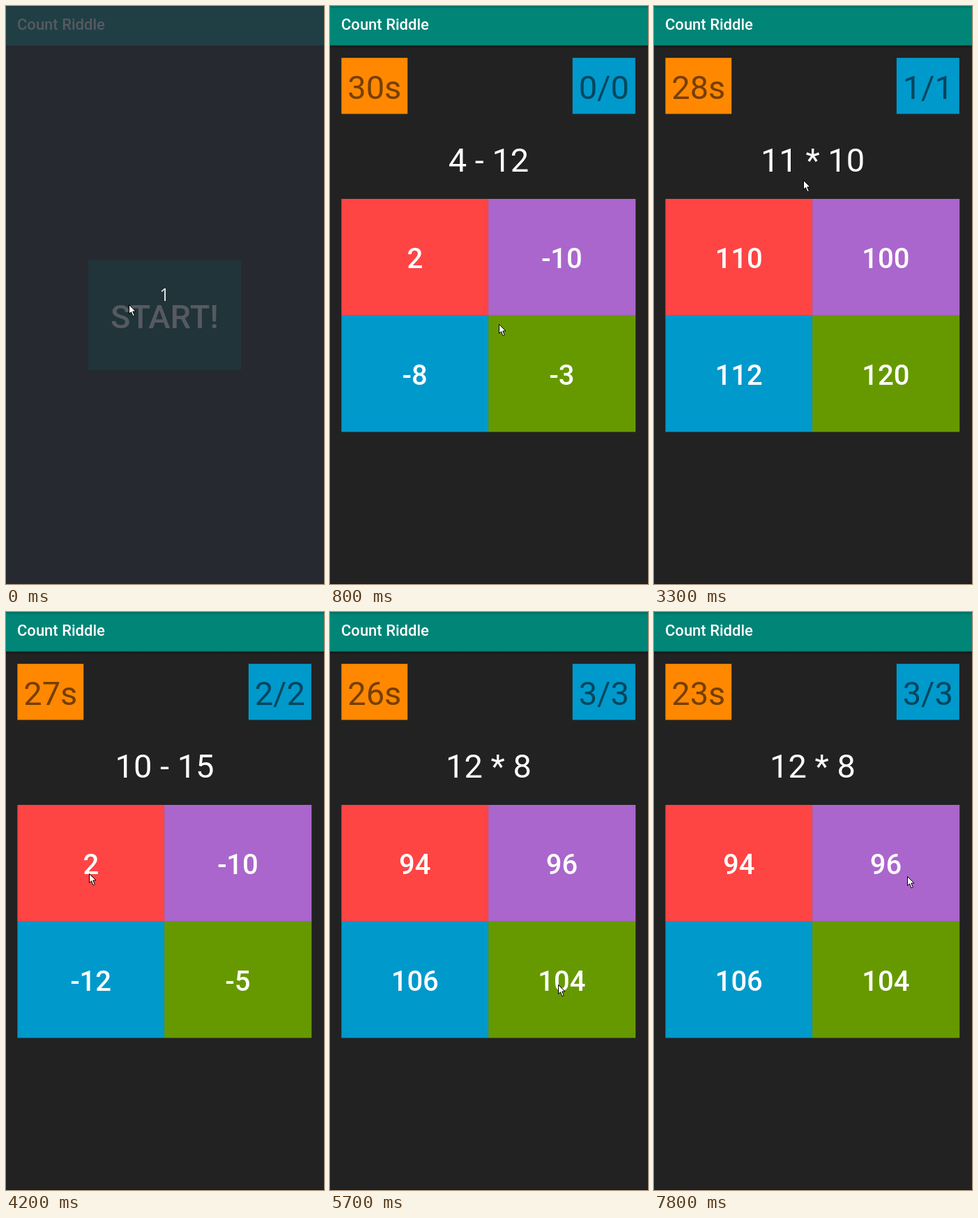
An HTML page for the animation above (8000 ms loop, 456x827 px).

```html
<!DOCTYPE html>
<html lang="en">
<head>
<meta charset="utf-8">
<title>Count Riddle</title>
<style>
html, body { margin: 0; width: 100%; height: 100%; overflow: hidden; background: #222; }
svg { display: block; width: 456px; height: 827px; }
text { font-family: Roboto, sans-serif; font-size: 47px; text-anchor: middle; fill: #fff; }
.bold { font-weight: 500; }
.tile text { font-size: 40px; font-weight: 500; }
.muted { fill: rgba(0, 0, 0, .54); }
#title { font-size: 22px; font-weight: 500; text-anchor: start; }
#count { font: 25px "Open Sans", "Noto Sans", sans-serif; fill: #e4e4e6; }
</style>
</head>
<body>
<svg viewBox="0 0 456 827">
  <defs>
    <linearGradient id="fall" x2="0" y2="1">
      <stop stop-opacity=".4"/><stop offset="1" stop-opacity="0"/>
    </linearGradient>
  </defs>
  <rect width="456" height="827" fill="#222"/>
  <rect y="56" width="456" height="5" fill="url(#fall)"/>
  <rect width="456" height="56.5" fill="#008577"/>
  <rect width="456" height="4" fill="url(#fall)" opacity=".5"/>
  <rect y="826" width="456" height="1" fill="#191919"/>
  <text id="title" x="16" y="34">Count Riddle</text>

  <g id="start">
    <rect x="118" y="520" width="219" height="4" fill="url(#fall)"/>
    <rect x="118" y="364" width="219" height="157" rx="1.5" fill="#005547"/>
    <text class="bold" x="227.5" y="461">START!</text>
  </g>

  <g id="game">
    <rect x="16.4" y="74.2" width="94.8" height="80.2" fill="#f80"/>
    <text id="timer" class="muted" x="63.8" y="133"></text>
    <rect x="347.8" y="74.2" width="90" height="80.2" fill="#09c"/>
    <text id="score" class="muted" x="392.8" y="133"></text>
    <text id="question" x="227.5" y="237"></text>
    <g id="tiles"></g>
  </g>

  <g id="dim">
    <rect width="456" height="827" fill="#292c36" opacity=".785"/>
    <text id="count" x="227.5" y="422">1</text>
  </g>
  <path id="cursor" d="M.5 .5V13.5L3.5 10.8L6 16.8L8.3 15.8L5.8 10H10Z"
        fill="#fff" stroke="#000" stroke-linejoin="round"/>
</svg>
<script>
const LOOP = 8000, STEP = 100, GAME_START = 800, SECONDS = 30;
const TILE = { x: 16.4, y: 276, w: 210.7, h: 166.5 };
const QUESTION = { x: 227, y: 225 };
const $ = id => document.getElementById(id);

// Each round opens at a time; the cursor then moves to the chosen answer.
const rounds = [
  { at: GAME_START, question: '4 - 12', answers: '2 -10 -8 -3',
    move: { from: 1300, to: 2400, x: 175, y: 476 } },
  { at: 2500, question: '11 * 10', answers: '110 100 112 120',
    move: { from: 2700, to: 3600, x: 119, y: 374 } },
  { at: 4000, question: '10 - 15', answers: '2 -10 -12 -5',
    move: { from: 4300, to: 5500, x: 327, y: 533 } },
  { at: 5700, question: '12 * 8', answers: '94 96 106 104',
    move: { from: 5800, to: 7800, x: 363, y: 378 } }
];

$('tiles').innerHTML = ['#f44', '#a6c', '#09c', '#690'].map((color, i) => {
  const x = TILE.x + i % 2 * TILE.w, y = TILE.y + (i >> 1) * TILE.h;
  // A slight overlap keeps the background out of the seams.
  return `<g class="tile">
    <rect x="${x}" y="${y}" width="${TILE.w + .4}" height="${TILE.h + .4}" fill="${color}"/>
    <text x="${x + TILE.w / 2}" y="${y + 99}"></text></g>`;
}).join('');
const labels = document.querySelectorAll('.tile text');

const show = (id, on) => $(id).setAttribute('visibility', on ? 'visible' : 'hidden');
const progress = (t, { from, to }) => Math.min(1, Math.max(0, (t - from) / (to - from)));
const ease = k => k * k * (3 - 2 * k);

// Moves from one point to the next, bowing towards the question when reading it.
function glide(start, move, t, pull) {
  const k = progress(t, move), bow = pull * Math.sin(Math.PI * k);
  const along = axis => {
    const p = start[axis] + (move[axis] - start[axis]) * ease(k);
    return p + (QUESTION[axis] - p) * bow;
  };
  return { x: along('x'), y: along('y') };
}

function cursorAt(t) {
  const press = { from: 0, to: 400, x: 242, y: 455 };
  const begin = glide({ x: 176, y: 427 }, press, t, 0);
  return rounds.filter(r => r.move.from < t)
    .reduce((p, r) => glide(p, r.move, t, 1), begin);
}

function draw(now) {
  const t = Math.floor(now % LOOP / STEP) * STEP;
  const index = Math.max(0, rounds.filter(r => r.at <= t).length - 1);
  const { question, answers } = rounds[index];
  $('timer').textContent = SECONDS - Math.floor((t - GAME_START) / 1000) + 's';
  $('score').textContent = `${index}/${index}`;
  $('question').textContent = question;
  answers.split(' ').forEach((answer, i) => labels[i].textContent = answer);
  show('dim', t < STEP);
  show('start', t < GAME_START);
  show('game', t >= GAME_START);
  const { x, y } = cursorAt(t);
  $('cursor').setAttribute('transform', `translate(${Math.round(x)} ${Math.round(y)})`);
}

const begin = performance.now();
function frame() {
  draw(performance.now() - begin);
  requestAnimationFrame(frame);
}
frame();
</script>
</body>
</html>
```
